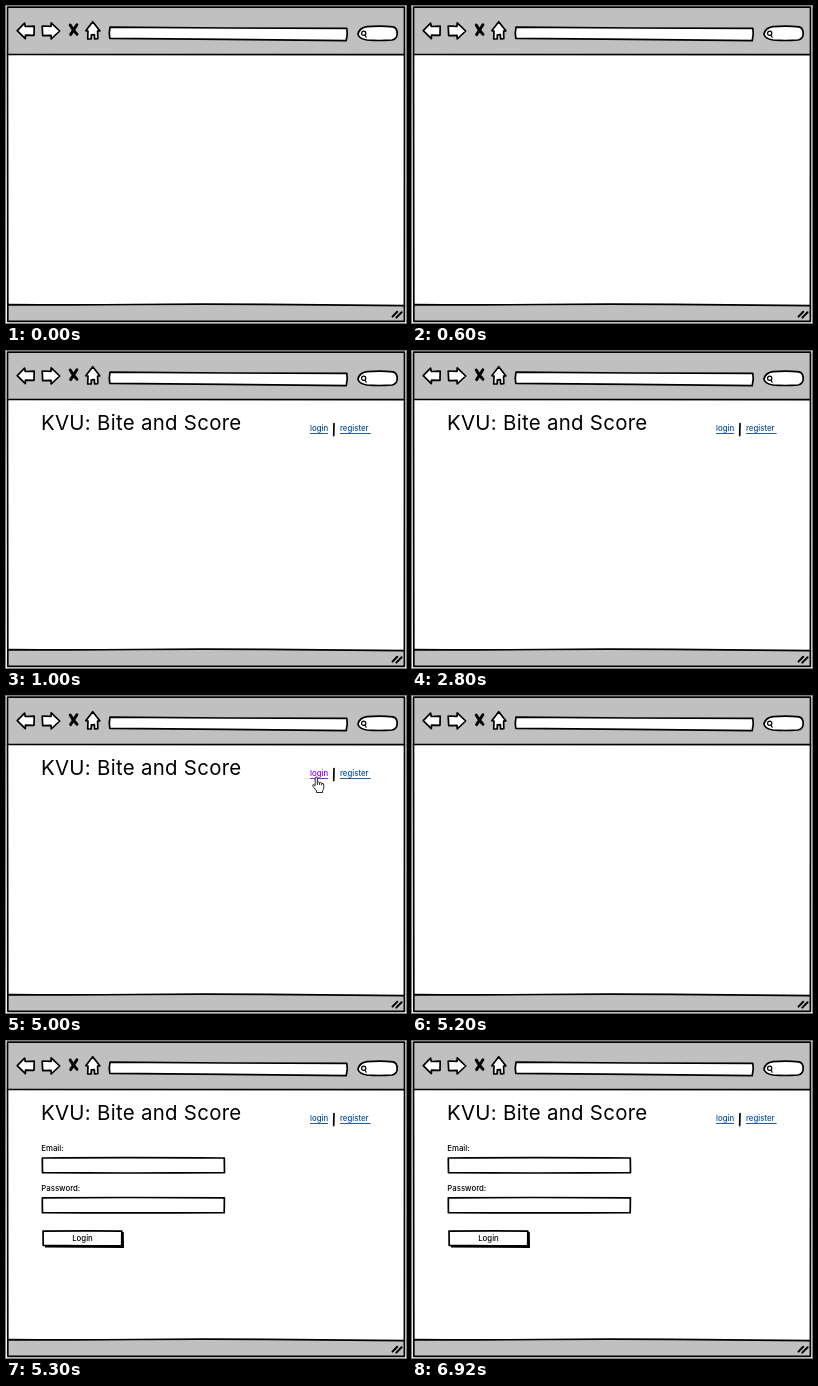
Recreate the animation shown at these times as an HTML page. Size 400x317 px, loop 8000 ms.

```html
<!DOCTYPE html>
<html lang="en">
<head>
<meta charset="utf-8">
<title>Login wireframe</title>
<style>
  html, body { margin: 0; width: 100%; height: 100%; overflow: hidden; background: #fff; }
  svg { display: block; width: 100%; height: 100%; }
  text { font: 500 7.8px Inter, "Open Sans", sans-serif; fill: #000; }
  .title { font-size: 20.4px; font-weight: 400; letter-spacing: .3px; }
  .link { fill: currentColor; }
  .rule { stroke: currentColor; stroke-width: .9; }
  .ink { stroke: #000; stroke-width: 1.7; stroke-linejoin: round; stroke-linecap: round; fill: #fff; }
  .bar { fill: #c0c0c0; }
  .line { fill: none; }
  #header { color: #0b4c9c; }
</style>
</head>
<body>
<svg viewBox="0 0 400 317">
  <rect width="400" height="317" fill="#fff"/>

  <!-- Browser window -->
  <g class="ink">
    <path class="bar" d="M1.5 1.2 H398.5 V48.6 L1.5 48.5 Z"/>
    <path class="bar" d="M1.8 298.6 Q70 299.3 130 298.5 T260 298.4 L398.4 299.6 V315.3 H1.8 Z"/>
    <path class="line" d="M1.5 48.5 L1.8 298.6 M398.5 48.6 L398.4 299.6"/>
    <path d="M11.2 24.7 L18.6 17.2 L19.3 20.5 L28.2 20.2 L28 29.3 L19.5 29.2 L19.3 32.6 Z"/>
    <path d="M53.7 25 L45.2 16.8 L45 20.4 L36.2 20 L36.7 29.6 L45 29.3 L45.2 33 Z"/>
    <path class="line" stroke-width="2.9" d="M64.2 19 Q67 24.3 71 28.3 M70.9 18.8 L64.6 28.6"/>
    <path d="M86.7 15.7 L79.8 24.7 L82 25.2 L81.7 33 L85.2 33 L85.3 28.8 L88.4 28.7 L88.6 33 L91.8 32.7 L91.6 25.2 L93.8 24.8 Z"/>
    <path d="M104 21.2 L220 22 L340.8 22.4 Q342 28 340.2 34.7 L220 33.4 L103.8 32.4 Q102.7 27 104 21.2 Z"/>
    <path d="M361 20.6 Q376 19.6 387 20.9 Q391 21.8 391.2 27.5 Q391.2 33 386 34 Q373 35 361 34 Q352.4 32.6 352 28 Q353.3 21.7 361 20.6 Z"/>
    <circle class="line" cx="357.7" cy="27.3" r="2.1" stroke-width="1.2"/>
    <path class="line" stroke-width="1.2" d="M359 29.2 L360.2 31.2"/>
    <path class="line" stroke-width="2" d="M386.5 310.6 L391.2 305.7 M390.3 311.6 L395.6 306.2"/>
  </g>

  <g id="header">
    <text class="title" x="35" y="79.4">KVU: Bite and Score</text>
    <g id="login">
      <text class="link" x="304" y="80.3">login</text>
      <path class="rule" d="M304 82.5 H322"/>
    </g>
    <path class="ink line" d="M328 72.5 L327.7 84.6"/>
    <text class="link" x="334" y="80.3">register</text>
    <path class="rule" d="M334 82.5 H364.7"/>
  </g>

  <g id="form">
    <text x="35.3" y="110.3">Email:</text>
    <path class="ink" d="M36.3 117 Q120 116.4 218.3 117 L218.5 131.6 Q130 132.3 36.5 131.7 Z"/>
    <text x="35.3" y="150.3">Password:</text>
    <path class="ink" d="M36.3 156.8 Q130 156.2 218.4 156.9 L218.2 171.7 Q120 172.2 36.4 171.7 Z"/>
    <path d="M39 191.5 L117.8 191 L118 207 L39 206.5 Z"/>
    <path class="ink" d="M37 190.2 Q80 189.6 115.8 190.1 L115.7 204.5 Q80 205.1 37.2 204.4 Z"/>
    <text x="76.5" y="200.3" text-anchor="middle">Login</text>
  </g>

  <path id="cursor" fill="#fff" stroke="#111" stroke-width=".9" stroke-linejoin="round"
    d="M309.2 89.8 V82.5 Q309.2 81.1 310.3 81.1 Q311.4 81.1 311.4 82.5 V86.3 Q312.7 85.3 313.6 86.6 Q314.9 85.8 315.7 87.3 Q317.8 87 317.8 89 V91.6 Q317.6 93.5 316.6 94.7 V96.5 H310.5 V94.8 L306.8 90.2 Q306.5 88.4 307.7 88.5 Z M311.4 86.3 V89 M313.6 86.6 V89 M315.7 87.3 V89.3"/>
</svg>
<script>
const LOOP = 8000;
const part = id => document.getElementById(id);
const [header, login, form, cursor] = ["header", "login", "form", "cursor"].map(part);
const between = (t, from, to) => t >= from && t < to;
const show = (el, on) => el.setAttribute("visibility", on ? "visible" : "hidden");

function render(t) {
  const submitted = t >= 5300;
  show(header, between(t, 1000, 5200) || submitted);
  show(form, submitted);
  show(cursor, between(t, 4000, 5200));
  login.style.color = between(t, 5000, 5200) ? "#8a00ff" : "";
}

const start = performance.now();
function tick() {
  render((performance.now() - start) % LOOP);
  requestAnimationFrame(tick);
}
tick();
</script>
</body>
</html>
```
